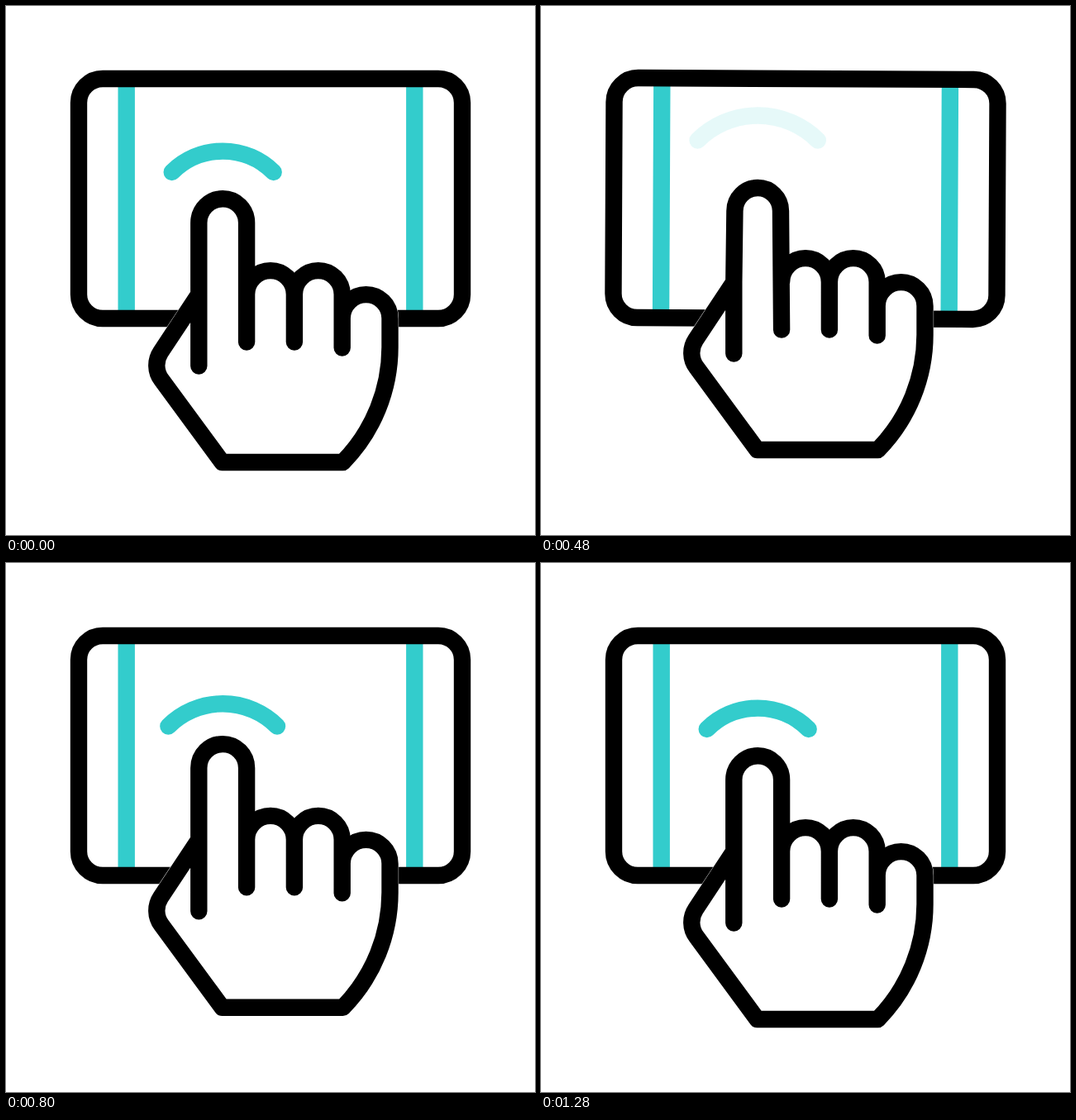
Recreate the animation shown at these times as an HTML page. Size 640 by 640 pixels, loop 1.32 s.

```html
<!DOCTYPE html>
<html lang="en">
<head>
<meta charset="utf-8">
<title>Swipe on a phone</title>
<style>
html, body { margin: 0; width: 100%; height: 100%; overflow: hidden; background: #fff; }
svg { display: block; width: 100%; height: 100%; }
</style>
</head>
<body>
<svg viewBox="0 0 640 640" fill="none" stroke="#000" stroke-width="20.4" stroke-linecap="round" stroke-linejoin="round">
  <g id="phone">
    <path d="M145.7 88V378M494.3 88V378" stroke="#3cc" stroke-linecap="butt"/>
    <rect x="88" y="88" width="464" height="290" rx="29"/>
  </g>
  <path id="wave" stroke="#3cc"/>
  <g id="hand">
    <path id="back" fill="#fff" stroke="#fff" stroke-width="21.2"/>
    <path id="lines"/>
  </g>
</svg>
<script>
const LOOP = 1320, STEP = 40;
const $ = id => document.getElementById(id);
const phone = $('phone'), wave = $('wave'), hand = $('hand'), back = $('back'), lines = $('lines');

const part = (t, a, b) => Math.min(1, Math.max(0, (t - a) / (b - a)));
const smooth = (t, a, b) => { const x = part(t, a, b); return x * x * (3 - 2 * x); };
const cubic = (t, a, b) => {
  const x = part(t, a, b);
  return x < .5 ? 4 * x ** 3 : 1 - 4 * (1 - x) ** 3;
};
const bell = (t, a, m, b) => smooth(t, a, m) - smooth(t, m, b);
const mix = (a, b, p) => a + (b - a) * p;

// Times below count steps of 40 ms.
function drawPhone(t) {
  phone.setAttribute('transform', `rotate(${2.08 * bell(t, 11, 15.5, 20)} 320 233)`);
}

function drawWave(t) {
  const rest = [61.5, 175.6], small = [55, 181.2], big = [66.7, 169.4];
  let half, top, alpha;
  if (t < 14.5) {
    const p = smooth(t, 3, 14.5);
    half = rest[0] + 12.7 * p;
    top = rest[1] - 49 * p;
    alpha = 1 - p;
  } else {
    const grow = bell(t, 15, 21, 27), settle = smooth(t, 27, 32);
    const pose = i => mix(small[i], big[i], grow) + (rest[i] - small[i]) * settle;
    half = pose(0);
    top = pose(1);
    alpha = part(t, 14.5, 15.5);
  }
  const sag = .413 * half, r = (half * half + sag * sag) / (2 * sag), y = top + sag;
  wave.setAttribute('d', `M${262.2 - half} ${y}A${r} ${r} 0 0 1 ${262.2 + half} ${y}`);
  wave.setAttribute('stroke-opacity', alpha);
}

function drawHand(t) {
  const lift = 15 * (cubic(t, 2, 13) - cubic(t, 16, 33));
  const press = bell(t, 5, 9.5, 14);
  const pinch = 2.7 * press, r = 28.9 - pinch, y = 262.2 + 1.4 * press;
  const tip = `L${233.3 + pinch} ${y}a${r} ${r} 0 0 1 ${2 * r} 0`;
  const knuckle = 'a28.9 28.9 0 0 1 57.8 0';
  const palm = 'V411A199 199 0 0 1 407.5 552H261.5L188 452A29 29 0 0 1 187.2 418.6L233.3 349';
  hand.setAttribute('transform', `translate(0 ${-lift})`);
  back.setAttribute('d', `M233.3 349${tip}L291.1 349${knuckle}${knuckle}V378${knuckle}${palm}Z`);
  lines.setAttribute('d', `M233.3 435.5V349${tip}L291.1 406.6` +
    `M291.1 349${knuckle}V406.6M348.9 349${knuckle}V413.6M406.7 378${knuckle}${palm}`);
}

function draw(now) {
  const t = Math.floor(((now + 1) % LOOP) / STEP);
  drawPhone(t);
  drawWave(t);
  drawHand(t);
}

function tick(now) {
  draw(now);
  requestAnimationFrame(tick);
}
draw(0);
requestAnimationFrame(tick);
</script>
</body>
</html>
```
